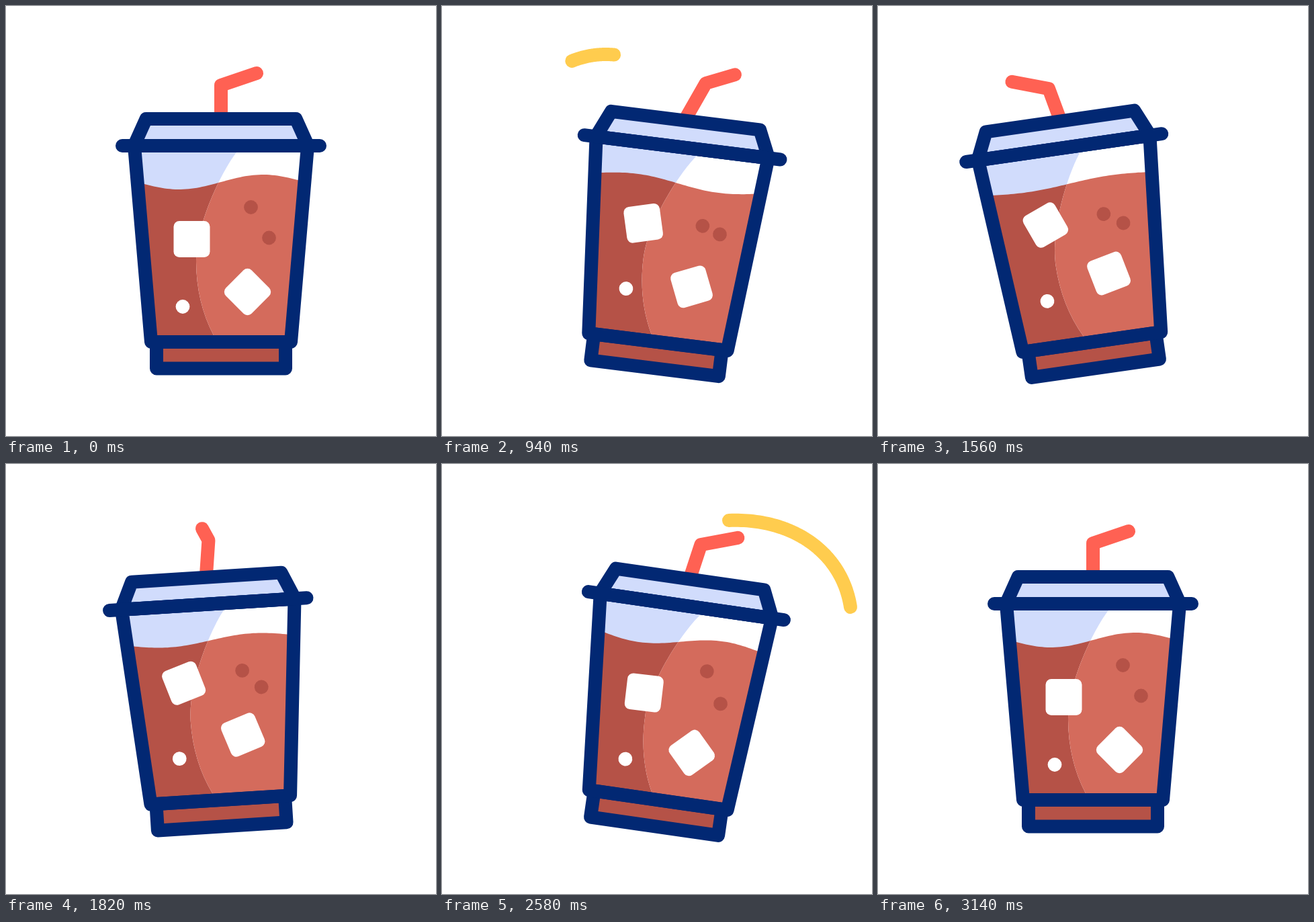
Recreate the animation shown at these times as an HTML page with a canvas. Size 640 by 640 pixels, loop 3.34 s.

```html
<!DOCTYPE html>
<html lang="en">
<head>
<meta charset="utf-8">
<title>Iced drink</title>
<style>
html, body { margin: 0; width: 100%; height: 100%; overflow: hidden; background: #fff; }
canvas { display: block; width: 100%; height: 100%; }
</style>
</head>
<body>
<canvas id="stage" width="640" height="640"></canvas>
<script>
const ctx = document.getElementById('stage').getContext('2d');
const LOOP = 3340, STEP = 20, RAD = Math.PI / 180;
const NAVY = '#022873', ICE = '#d1dcfc', DARK = '#b55247', LIGHT = '#d46b5c';
const CORAL = '#ff6153', YELLOW = '#ffcc4e', WHITE = '#fff';
const PIVOT = { x: 320, y: 512 };

const BODY = [[191, 208], [216, 500], [424, 500], [449, 208]];
const LID = [[190.5, 208], [208.5, 168], [431.5, 168], [449.5, 208]];
const BASE = [[224, 500], [224, 539.5], [416, 539.5], [416, 500]];

const smooth = x => x * x * (3 - 2 * x);

// Cubic bezier (0.5, 0, 0.5, 1)
function swing(x) {
  let lo = 0, hi = 1;
  for (let i = 0; i < 24; i++) {
    const m = (lo + hi) / 2;
    if (1.5 * m * (1 - m) + m * m * m < x) lo = m; else hi = m;
  }
  return smooth(lo);
}

// Keys are [time, value] pairs
function track(t, keys, ease) {
  if (t <= keys[0][0]) return keys[0][1];
  for (let i = 1; i < keys.length; i++) {
    const [t0, a] = keys[i - 1], [t1, b] = keys[i];
    if (t < t1) return a + (b - a) * ease((t - t0) / (t1 - t0));
  }
  return keys[keys.length - 1][1];
}

// Rises from 0 to size at peak, then back to 0
const bob = (t, peak, end, size) => track(t, [[200, 0], [peak, size], [end, 0]], smooth);
const ramp = (t, from, to) => track(t, [[from, 0], [to, 1]], smooth);

function path(points, closed) {
  ctx.beginPath();
  points.forEach(([x, y]) => ctx.lineTo(x, y));
  if (closed) ctx.closePath();
}

function line(points, color, closed) {
  path(points, closed);
  ctx.strokeStyle = color;
  ctx.stroke();
}

function fill(points, color) {
  path(points, true);
  ctx.fillStyle = color;
  ctx.fill();
}

function dot(x, y, color) {
  ctx.beginPath();
  ctx.arc(x, y, 10.4, 0, 2 * Math.PI);
  ctx.fillStyle = color;
  ctx.fill();
}

function cube(x, y, deg) {
  ctx.save();
  ctx.translate(x, y);
  ctx.rotate(deg * RAD);
  ctx.beginPath();
  ctx.roundRect(-27, -27, 54, 54, 8.5);
  ctx.fillStyle = WHITE;
  ctx.fill();
  ctx.restore();
}

// Strokes the part of a curve between tail and head, both 0 to 1
function sweep(curve, tail, head) {
  if (head <= tail) return;
  const points = [];
  for (let i = 0; i <= 60; i++) points.push(curve(tail + (head - tail) * i / 60));
  line(points, YELLOW);
}

function leftArc(k) {
  const a = Math.PI + (Math.PI / 2 + 0.09) * k;
  return [244 + 135 * Math.cos(a), 207 + 135 * Math.sin(a)];
}

function rightArc(k) {
  const mix = (a, b, c, d) => {
    const m = 1 - k;
    return a * m * m * m + 3 * b * m * m * k + 3 * c * m * k * k + d * k * k * k;
  };
  return [mix(608, 595, 520, 427), mix(213, 130, 80, 84)];
}

function straw(t) {
  const lean = track(t, [[200, 0], [740, 27], [1530, -10], [2160, 29.6], [2850, 0]], swing);
  const turn = track(t, [[740, 1], [1530, -1], [2160, 1]], swing);
  const x = 320 + lean, y = 118 - 0.37 * lean - 2 * (1 - turn);
  line([[320, 164], [x, y], [x + 53 * turn, y - 18]], CORAL);
}

function drink(t) {
  const wave = track(t, [[200, 1], [900, -0.6], [1000, -0.6], [1800, 0.6], [3140, 1]], smooth);
  const surface = [];
  for (let x = 180; x <= 460; x += 4) {
    surface.push([x, 262 + 11 * wave * Math.sin(Math.PI * (320 - x) / 125)]);
  }
  const liquid = [...surface, [460, 520], [180, 520]];

  ctx.save();
  path(BODY, true);
  ctx.clip();
  ctx.fillStyle = ICE;
  ctx.fillRect(180, 200, 280, 310);
  fill(liquid, DARK);

  // Lit side, bounded by a wide curve
  ctx.save();
  ctx.beginPath();
  ctx.moveTo(360, 200);
  ctx.lineTo(343, 218);
  ctx.bezierCurveTo(325, 240, 283, 320, 283, 380);
  ctx.bezierCurveTo(283, 420, 292, 458, 309, 490);
  ctx.lineTo(316, 502);
  ctx.lineTo(460, 502);
  ctx.lineTo(460, 200);
  ctx.clip();
  ctx.fillStyle = WHITE;
  ctx.fillRect(180, 200, 280, 310);
  fill(liquid, LIGHT);
  ctx.restore();

  dot(364.5, 299.5 + bob(t, 850, 2760, 21), DARK);
  dot(391.5, 345 - bob(t, 1150, 2500, 17.5), DARK);
  dot(263, 447.5 - bob(t, 1050, 2800, 21.5), WHITE);
  cube(276.5, 347 - bob(t, 1420, 2800, 30), -bob(t, 1420, 2800, 22.5));
  cube(359.5, 425.5 - bob(t, 1540, 2820, 23), 45 + bob(t, 1420, 2740, 33));
  ctx.restore();
}

function draw(t) {
  ctx.fillStyle = WHITE;
  ctx.fillRect(0, 0, 640, 640);
  ctx.lineWidth = 20;
  ctx.lineCap = ctx.lineJoin = 'round';

  const tilt = track(t, [[190, 0], [670, 10.3], [1540, -8.2], [2310, 10.2], [2400, 10.2], [2950, 0]], swing);
  ctx.save();
  ctx.translate(PIVOT.x, PIVOT.y);
  ctx.rotate(tilt * RAD);
  ctx.translate(-PIVOT.x, -PIVOT.y);
  straw(t);
  fill(BASE, DARK);
  fill(LID, ICE);
  drink(t);
  line(BASE, NAVY, true);
  line(BODY, NAVY, true);
  line(LID, NAVY, true);
  line([[173, 208], [467, 208]], NAVY);
  ctx.restore();

  sweep(leftArc, ramp(t, 720, 1060), ramp(t, 220, 540));
  sweep(rightArc, ramp(t, 2600, 2940), ramp(t, 2180, 2540));
}

const start = performance.now();
function tick() {
  const t = (performance.now() - start) % LOOP;
  draw(Math.floor(t / STEP) * STEP);
  requestAnimationFrame(tick);
}
tick();
</script>
</body>
</html>
```
